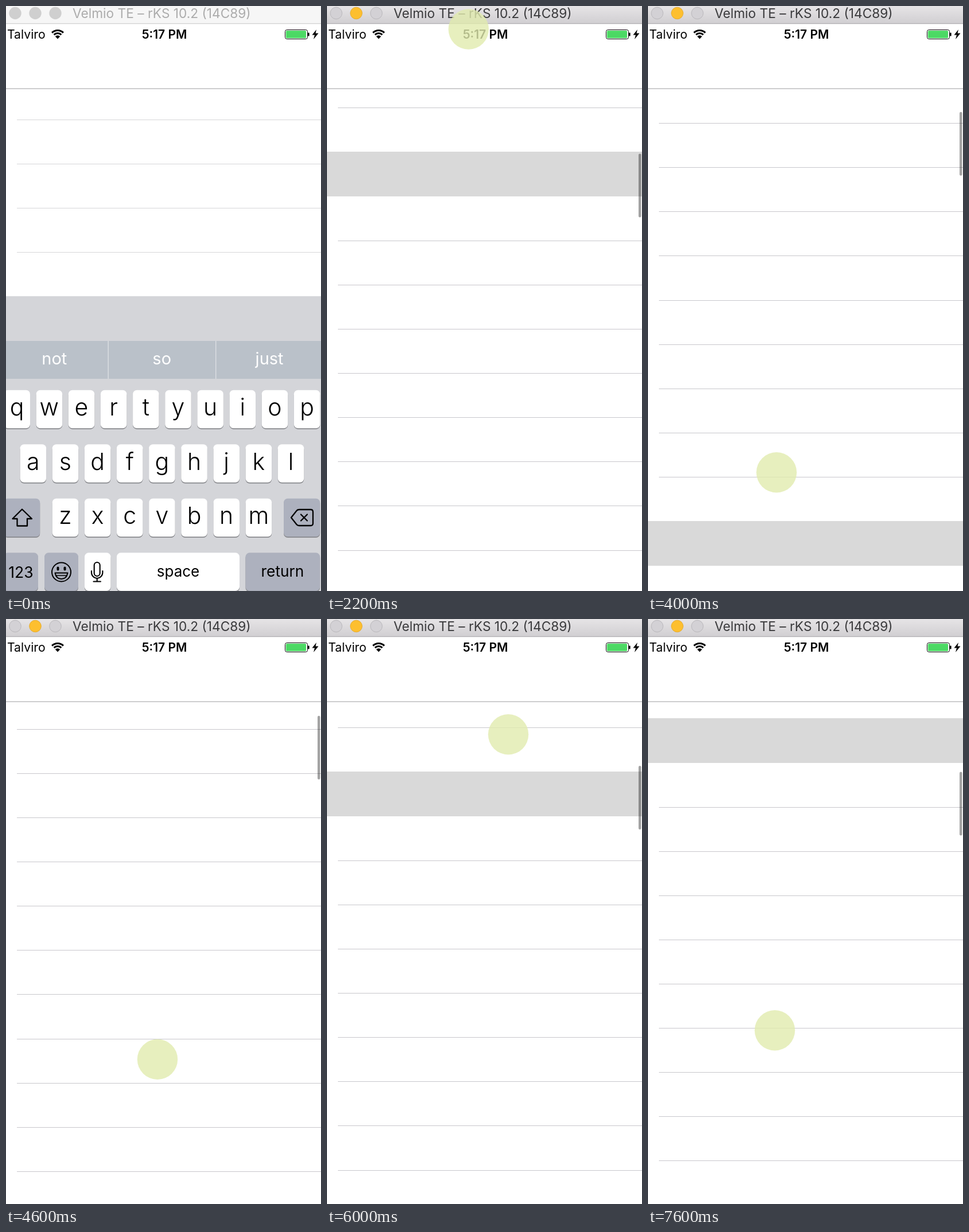
Write an HTML page with a canvas that moves like this. It is 549 px wide and 1020 px high and loops after 8 s.

```html
<!DOCTYPE html>
<html lang="en">
<head>
<meta charset="utf-8">
<title>Scrolling list</title>
<style>
  html, body { margin: 0; width: 100%; height: 100%; overflow: hidden; background: #fff; }
  canvas { display: block; width: 549px; height: 1020px; }
</style>
</head>
<body>
<canvas id="stage" width="549" height="1020"></canvas>
<script>
const W = 549, H = 1020, LOOP = 8000, STEP = 200;
const ROW = 77.12, NAV = 144, KEYS_TOP = 584, MARKED_ROW = 14;
const FONT = 'Inter, Roboto, sans-serif';
const g = document.getElementById('stage').getContext('2d');

// Turning points of the pointer: time, x, y
const turns = [[400, 22, 590], [1600, 235, 235], [2000, 246, 37], [2800, 249, 50],
  [3200, 251, 192], [4000, 224, 813], [4200, 228, 955], [5000, 300, 580],
  [5200, 309, 339], [5400, 315, 187], [6000, 316, 201], [7600, 221, 717]];

const mix = (a, b, k) => a + (b - a) * k;
const clamp = k => Math.max(0, Math.min(1, k));

function pointer(t) {
  const i = turns.findIndex(p => p[0] >= t);
  if (i < 1) return { x: turns[0][1], y: turns[0][2] };
  const [a, b] = [turns[i - 1], turns[i]];
  const k = (t - a[0]) / (b[0] - a[0]);
  return { x: mix(a[1], b[1], k), y: mix(a[2], b[2], k) };
}

// Top of the marked row: follows the pointer in a drag, then coasts to rest.
function markedTop(t) {
  const y = pointer(t).y;
  const coast = (rest, speed, from, decay) => rest + speed * Math.exp((from - t) / decay);
  if (t <= 2000) return Math.min(506, y + 241);
  if (t < 3200) return coast(246, 32, 2000, 150);
  if (t <= 4200) return y + mix(59.5, 85.2, clamp((t - 3200) / 800));
  if (t < 5000) return 1040;
  if (t < 5300) return y + 460.4;
  return coast(169.3, 97.2, 6000, 500);
}

function keyboardShift(t) {
  return t < 1600 ? 0 : 1 + (t - 1600) * 1.65;
}

function rect(x, y, w, h, color) {
  g.fillStyle = color;
  g.fillRect(x, y, w, h);
}

function round(x, y, w, h, r, color) {
  g.beginPath();
  g.roundRect(x, y, w, h, r);
  g.fillStyle = color;
  g.fill();
}

function disc(x, y, r, fill, stroke) {
  g.beginPath();
  g.arc(x, y, r, 0, Math.PI * 2);
  if (fill) { g.fillStyle = fill; g.fill(); }
  if (stroke) { g.strokeStyle = stroke; g.stroke(); }
}

function text(str, x, y, size, color, weight = 400, align = 'center') {
  g.font = `${weight} ${size}px ${FONT}`;
  g.textAlign = align;
  g.fillStyle = color;
  g.fillText(str, x, y);
}

function path(d, width, fill) {
  const p = new Path2D(d);
  if (fill) { g.fillStyle = fill; g.fill(p); }
  if (width) { g.lineWidth = width; g.strokeStyle = '#000'; g.stroke(p); }
}

function drawList(top, typing) {
  g.save();
  g.beginPath();
  g.rect(0, NAV, W, H - NAV);
  g.clip();
  for (let i = -MARKED_ROW; i < 13; i++) {
    if (i === 0 || i === 1) continue;
    rect(19, Math.round(top + i * ROW), W - 19, 1, typing ? '#d6d6d8' : '#c8c7cc');
  }
  rect(0, Math.floor(top), W, 78, typing ? '#d4d5d9' : '#d9d9d9');
  g.restore();
  rect(0, NAV - 0.5, W, 1.3, '#b4b4b6');
}

function drawScrollBar(t, top, typing) {
  const idle = t < 1600 || (t > 2600 && t < 3200) || (t > 4600 && t < 5000);
  if (idle) return;
  const offset = NAV + MARKED_ROW * ROW - top;
  round(543, 148 + offset / (typing ? 19.2 : 8.86), 4.5, typing ? 62 : 111, 2.2, 'rgba(0,0,0,.36)');
}

function drawTitle(active, typing) {
  let fill = active ? '#d5d5d9' : '#f6f6f6';
  if (!typing) {
    fill = g.createLinearGradient(0, 0, 0, 30);
    fill.addColorStop(0, '#e6e4e6');
    fill.addColorStop(1, '#d1cfd2');
  }
  rect(0, 0, W, 30, fill);
  rect(0, 30, W, 1.3, active ? '#b0aeb2' : '#d2d2d2');
  g.lineWidth = 1;
  for (let i = 0; i < 3; i++) {
    const x = 16 + 35 * i;
    if (!active) disc(x, 12.5, 10.7, '#cfcfcf');
    else if (i === 1) disc(x, 12.5, 10.3, '#fdbf2f', '#e5ab2e');
    else disc(x, 12.5, 10.3, '#d3d1d5', '#b9b7bb');
  }
  text('Velmio TE – rKS 10.2 (14C89)', 116, 21, 22.7, active ? '#3a3a3c' : '#acacac', 400, 'left');
}

function drawStatus() {
  text('Talviro', 2, 57, 21.2, '#000', 400, 'left');
  text('5:17 PM', 276, 57, 21, '#000', 600);
  g.lineCap = 'butt';
  g.strokeStyle = '#000';
  g.lineWidth = 3;
  for (const r of [9, 14]) {
    g.beginPath();
    g.arc(90, 56.5, r, -Math.PI * 0.75, -Math.PI * 0.25);
    g.stroke();
  }
  path('M90 57.5 L85.8 53 A6 6 0 0 1 94.2 53 Z', 0, '#000');
  g.lineWidth = 1;
  g.beginPath();
  g.roundRect(486.5, 41.5, 39, 16, 3);
  g.stroke();
  round(488, 43, 35, 13, 1.5, '#4cd964');
  round(526.2, 46.5, 2.4, 6, 1, '#000');
  path('M541 41 L533.5 50.5 H538 L536 58 L544.5 47.5 H539.5 Z', 0, '#000');
}

function key(x, y, w, gray) {
  round(x, y + 1.7, w, 66.5, 7, '#88898d');
  round(x, y, w, 66.5, 7, gray ? '#adb1be' : '#fff');
}

function drawKeyboard(shift) {
  const rowY = i => 669.7 + 94.55 * i;
  g.save();
  g.translate(0, shift);
  rect(0, KEYS_TOP, W, 500, '#d4d5d9');
  rect(0, KEYS_TOP, W, 66, '#bac1c9');
  ['not', 'so', 'just'].forEach((word, i) => {
    text(word, 84.3 + 187.4 * i, 625, 29, '#fff');
    if (i) rect(187.5 * i - 10, KEYS_TOP, 1.4, 66, '#dcdfe3');
  });

  ['qwertyuiop', 'asdfghjkl', 'zxcvbnm'].forEach((row, r) => {
    const left = 249.2 - 28.08 * (row.length - 1);
    [...row].forEach((c, i) => {
      const x = left + 56.15 * i;
      key(x, rowY(r), 45.5);
      text(c, x + 22.7, rowY(r) + 44.5, 41, '#000', 300);
    });
  });

  key(-4, rowY(2), 63.2, true);
  key(484, rowY(2), 63.2, true);
  key(-4, rowY(3), 60, true);
  key(67, rowY(3), 59, true);
  key(137, rowY(3), 45.5);
  key(193, rowY(3), 214);
  key(417.5, rowY(3), 129.7, true);
  text('123', 26, 997, 26.5, '#000');
  text('space', 300, 995, 26, '#000');
  text('return', 482, 995, 26.3, '#000');

  g.lineCap = g.lineJoin = 'round';
  path('M28 877.5 L45 894 H37 V906.5 H19.5 V894 H11.5 Z', 2.3);
  path('M497 892 L506.5 880 Q508 878 511 878 H531 Q535 878 535 882 V902 Q535 906 531 906 H511 Q508 906 506.5 904 Z', 2.3);
  path('M514 886.5 L525 897.5 M525 886.5 L514 897.5', 2.3);

  g.lineWidth = 2;
  disc(96.5, 987, 16.5, null, '#000');
  for (const x of [90.5, 102.5]) round(x - 2, 977.6, 4, 6.8, 2, '#000');
  path('M85.5 988.5 H107.5 Q105.5 999 96.5 999 Q87.5 999 85.5 988.5 Z', 2);
  path('M87 993 H106', 1.6);

  g.lineWidth = 2.1;
  g.beginPath();
  g.roundRect(153.7, 970, 10, 24, 5);
  g.stroke();
  path('M149 985 V988 A9.7 9.7 0 0 0 168.4 988 V985 M158.7 998 V1003.5 M152.5 1003.5 H165', 2.1);
  g.restore();
}

function draw(time) {
  const t = Math.min(7600, Math.floor(time % LOOP / STEP) * STEP);
  const top = markedTop(t), shift = keyboardShift(t), typing = t < 1800;
  rect(0, 0, W, H, '#fff');
  drawList(top, typing);
  drawScrollBar(t, top, typing);
  if (shift < H - KEYS_TOP) drawKeyboard(shift);
  drawStatus();
  drawTitle(t >= 1000, typing);
  if (t >= 400) {
    const p = pointer(t);
    disc(p.x, p.y + 0.3, 35.2, 'rgba(226,236,174,.8)');
  }
}

const start = performance.now();
function tick() {
  draw(performance.now() - start);
  requestAnimationFrame(tick);
}
tick();
</script>
</body>
</html>
```
